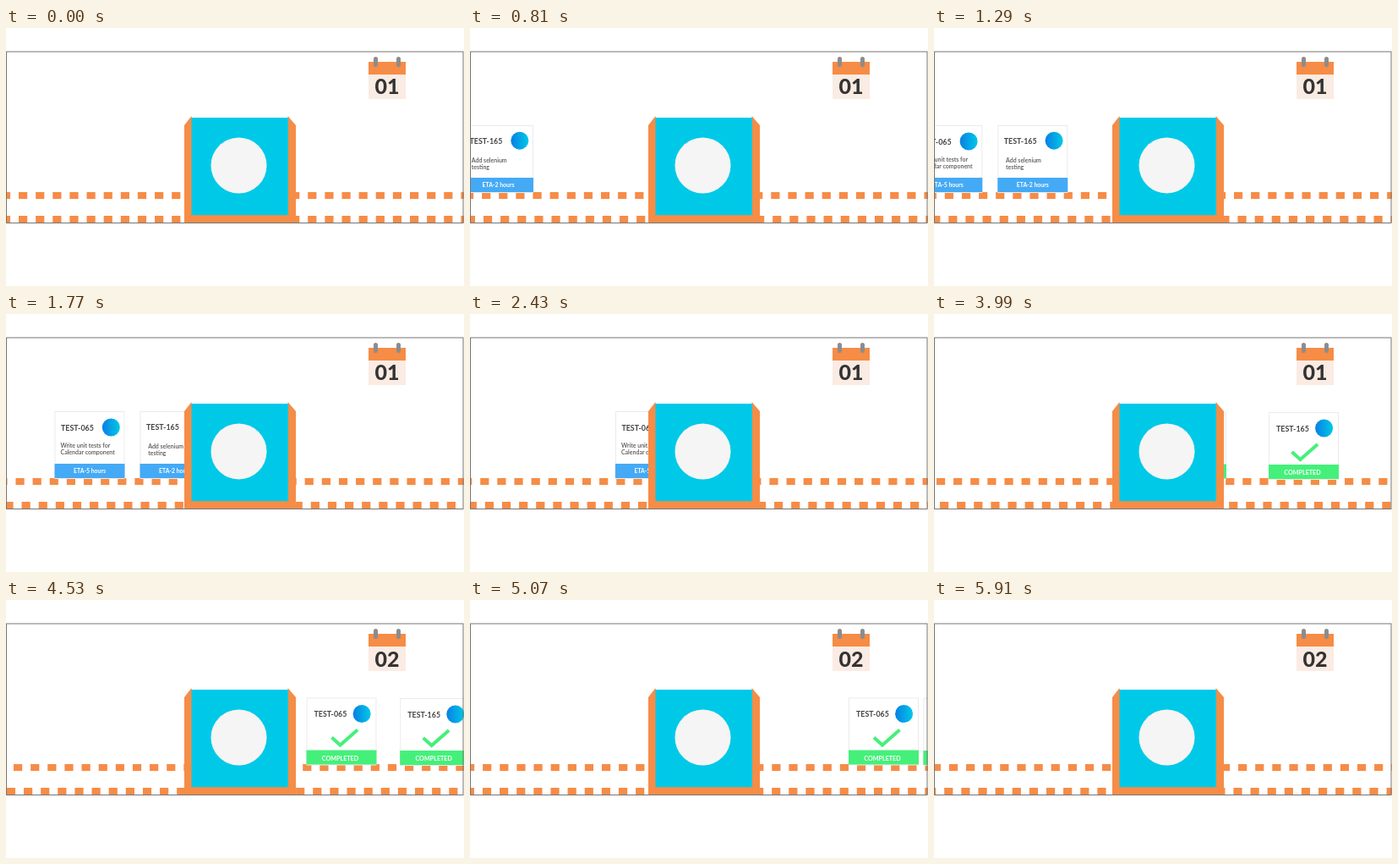
Recreate the animation shown at these times as an HTML page. Size 542 by 305 pixels, loop 5.94 s.

```html
<!DOCTYPE html>
<html lang="en">
<head>
<meta charset="utf-8">
<title>Task conveyor</title>
<style>
  html, body { margin: 0; width: 100%; height: 100%; overflow: hidden; background: #fff; }
  svg { display: block; width: 542px; height: 305px; font-family: Lato, Inter, sans-serif; }
  .belt { stroke: #f68c46; stroke-width: 8; stroke-dasharray: 10.2 9.93; }
  .title { font-size: 8.9px; font-weight: 700; fill: #444; }
  .note { font-size: 7px; font-weight: 600; fill: #555; }
  .label { font-size: 6.9px; font-weight: 700; fill: #fff; text-anchor: middle; }
  .done { font-size: 7.2px; }
  .day { font-size: 25px; font-weight: 800; fill: #333; text-anchor: middle; }
</style>
</head>
<body>
<svg viewBox="0 0 542 305">
  <defs>
    <linearGradient id="avatar">
      <stop stop-color="#087fe6"/>
      <stop offset="1" stop-color="#00c8e6"/>
    </linearGradient>
  </defs>

  <line class="belt" id="top" x2="542" y1="198" y2="198"/>
  <line class="belt" id="bottom" x2="542" y1="226" y2="226"/>
  <g id="cards"></g>

  <!-- machine -->
  <path fill="#f68c46" d="M211 115L219.5 104V106H333.5V104L343 115V231H211Z"/>
  <path fill="#00c9e8" d="M219.5 106H334V221.3H219.5Z"/>
  <circle cx="275.5" cy="162.5" r="33" fill="#f5f5f5"/>

  <!-- calendar -->
  <path fill="#faebe3" d="M429 55h44v29h-44z"/>
  <path fill="#f68c46" d="M429 40h44v15h-44z"/>
  <path stroke="#8c8c8c" stroke-width="5" stroke-linecap="round" d="M437.5 36.5v7M464.5 36.5v7"/>
  <text class="day" id="day1" x="451" y="78">01</text>
  <text class="day" id="day2" x="451" y="78.5">02</text>

  <rect x=".5" y="28" width="540.5" height="202.5" fill="none" stroke="#777"/>
</svg>
<script>
const LOOP = 5940, STEP = 30, HIDDEN_X = 235;
const BELT_START = 15, BELT_SPEED = .1231;
const $ = id => document.getElementById(id);
const clamp = v => Math.max(0, Math.min(1, v));

const frame = (color, avatarX, title, titleX, headY = 134) => `
  <rect x=".5" y="115.5" width="82" height="79" fill="#fff" stroke="#ebebeb"/>
  <rect y="177" width="83" height="17" fill="${color}"/>
  <circle cx="${avatarX}" cy="${headY}" r="10.5" fill="url(#avatar)"/>
  <text class="title" x="${titleX}" y="${headY + 3.8}">${title}</text>`;

const todo = (title, headY, lines, x, y, hours) => frame('#45aaf5', 66.8, title, 7.5, headY) +
  lines.map((s, i) => `<text class="note" x="${x}" y="${y + 8 * i}">${s}</text>`).join('') +
  `<text class="label" x="41.5" y="187.6">ETA-${hours} hours</text>`;

const done = (title, checkX) => frame('#45f07a', 65.6, title, 9) +
  `<path d="M${checkX} 162l10 9 20.5-18" fill="none" stroke="#45f07a" stroke-width="4"/>
  <text class="label done" x="40" y="189">COMPLETED</text>`;

// Each card passes x at time t with a constant speed in px/ms.
const cards = [
  { html: todo('TEST-165', 133.2, ['Add selenium', 'testing'], 9.7, 159, 2), t: 1770, x: 158.5, v: .1734, entering: true },
  { html: todo('TEST-065', 134, ['Write unit tests for', 'Calendar component'], 7, 157.6, 5), t: 1770, x: 57.5, v: .1734, entering: true },
  { html: done('TEST-165', 27.5), t: 3990, x: 396, v: .13, y: 1 },
  { html: done('TEST-065', 30), t: 5070, x: 448, v: .1713, y: .5 }
];
for (const card of cards) {
  card.node = document.createElementNS('http://www.w3.org/2000/svg', 'g');
  card.node.innerHTML = card.html;
  $('cards').append(card.node);
}

function draw(now) {
  const t = Math.floor(now % LOOP / STEP) * STEP;
  for (const { node, t: at, x, v, y = 0, entering } of cards) {
    const pos = x + v * (t - at);
    const left = entering ? Math.min(pos, HIDDEN_X) : Math.max(pos, HIDDEN_X);
    node.setAttribute('transform', `translate(${left} ${y})`);
  }
  // The lower run of the belt returns the other way.
  $('top').style.strokeDashoffset = -BELT_START - BELT_SPEED * t;
  $('bottom').style.strokeDashoffset = -BELT_START + BELT_SPEED * t;
  const fade = clamp((t - 4080) / 300);
  $('day1').style.opacity = 1 - fade;
  $('day2').style.opacity = fade;
}

const start = performance.now();
function tick() {
  draw(performance.now() - start);
  requestAnimationFrame(tick);
}
tick();
</script>
</body>
</html>
```
